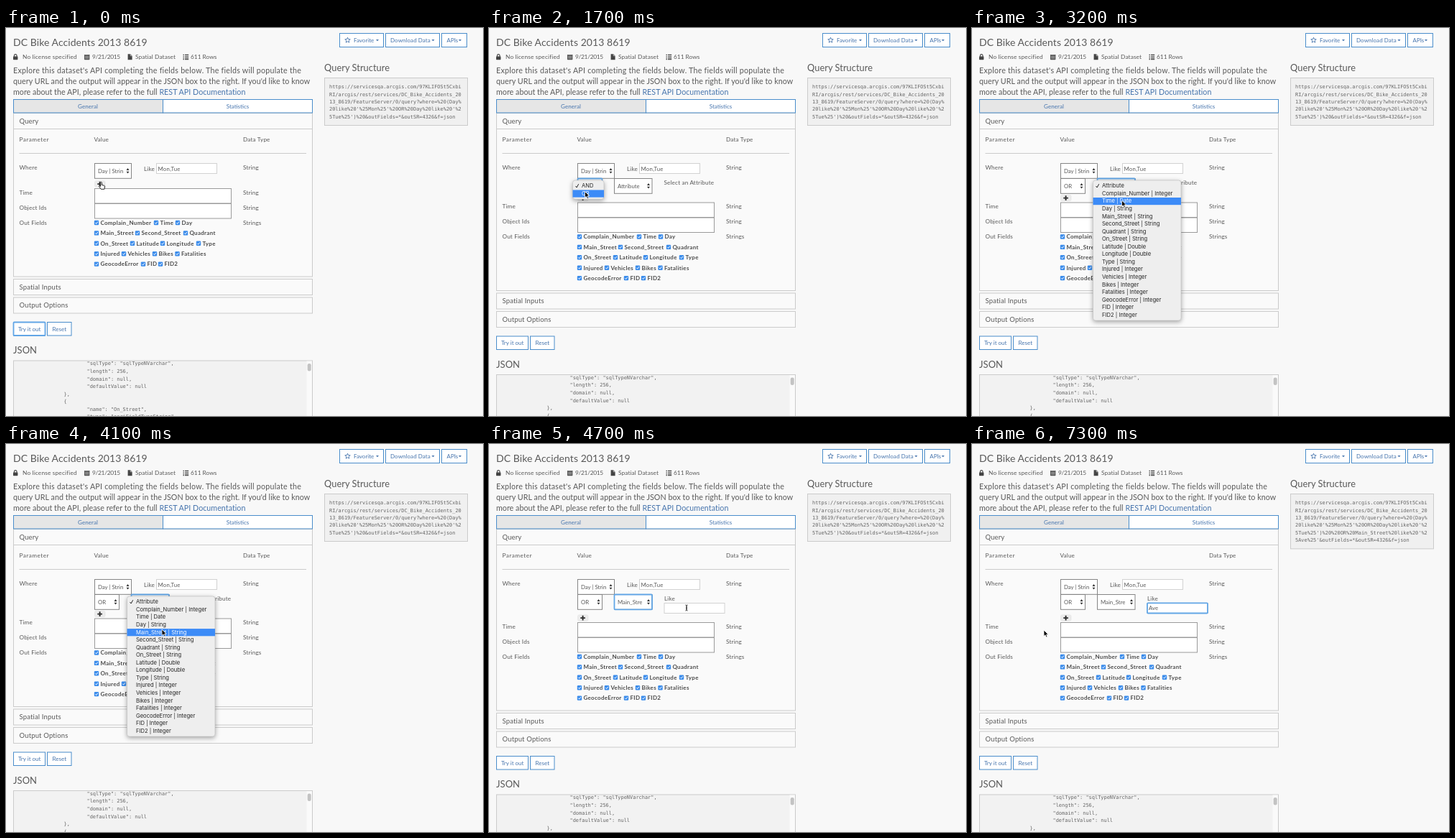
Write an HTML page that moves like this. It is 664 px wide and 540 px high and loops after 7.4 s.

```html
<!DOCTYPE html>
<html lang="en">
<head>
<meta charset="utf-8">
<title>Dataset API query</title>
<style>
  html, body { margin: 0; width: 100%; height: 100%; overflow: hidden; background: #f8f8f8; }
  svg { display: block; width: 664px; height: 540px; }
  text { font-family: Lato, sans-serif; font-kerning: normal; white-space: pre; }
  .mono { font-family: "DejaVu Sans Mono", monospace; }
  .menu { filter: drop-shadow(0 2px 3px rgba(0, 0, 0, .35)); }
  .menu text { font-family: Inter, sans-serif; }
</style>
</head>
<body>
<svg id="stage" viewBox="0 0 664 540" xmlns="http://www.w3.org/2000/svg"></svg>
<script>
const LOOP = 7400, STEP = 100;
const INK = '#595959', LINK = '#4674ad', BLUE = '#4a8dcb', LINE = '#cbcbcb', FOCUS = '#62a6e6';
const stage = document.getElementById('stage');

// Drawing helpers; text is placed by its visual middle.
function text(x, mid, size, str, o = {}) {
  const { ls = 0, fill = INK, weight = 400, anchor = 'start', cls = '', id = '' } = o;
  return `<text id="${id}" class="${cls}" x="${x}" y="${mid + size * .35}" font-size="${size}" ` +
    `letter-spacing="${ls}" fill="${fill}" font-weight="${weight}" text-anchor="${anchor}">${str}</text>`;
}
const rect = (x, y, x2, y2, fill, stroke = 'none', extra = '') =>
  `<rect x="${x}" y="${y}" width="${x2 - x}" height="${y2 - y}" fill="${fill}" stroke="${stroke}" ${extra}/>`;
const path = (d, fill, extra = '') => `<path d="${d}" fill="${fill}" ${extra}/>`;
const group = (id, body, extra = '') => `<g id="${id}" ${extra}>${body}</g>`;
const ring = (id, x, y, x2, y2) =>
  rect(x, y, x2, y2, 'none', FOCUS, `id="${id}" stroke-width="1.8" rx="1"`);
const label = (x, mid, str, ls = .15) => text(x, mid, 8.2, str, { ls });
const mono = (x, mid, str, id) => text(x, mid, 6.95, str, { cls: 'mono', fill: '#666', id });
const caret = x => path(`M${x - 2} 16h4l-2 2.3z`, LINK);
const button = (x, y, x2, y2) => rect(x, y, x2, y2, '#fff', BLUE);
const btnText = (x, mid, str, ls = 0) => text(x, mid, 8, str, { fill: LINK, ls });

function select(x, y, x2, str, id) {
  const ax = x2 - 5, m = y + 10.3;
  return rect(x, y, x2, y + 20.8, '#fff', '#858585') + text(x + 4.5, m, 7.8, str, { id }) +
    path(`M${ax - 2} ${m - .9}h4l-2 -2.8zM${ax - 2} ${m + .9}h4l-2 2.8z`, '#333');
}

function check(x, y, str) {
  return rect(x - 3.2, y - 3.2, x + 3.2, y + 3.2, '#3b8ceb', 'none', 'rx="1.2"') +
    path(`M${x - 1.7} ${y}l1.3 1.5 2.3 -3`, 'none', 'stroke="#fff" stroke-width="1"') +
    text(x + 5.4, y, 8, str, { weight: 700, ls: .3, fill: '#4c4c4c' });
}

const ROW = 10.55, MENU_Y = 219.7;
function menu(id, x, x2, items) {
  const rows = items.map((s, i) => text(x + 12.5, MENU_Y + i * ROW, 7.6, s, { fill: '#262626' })).join('');
  const bar = rect(x, MENU_Y - 4.8, x2, MENU_Y + 5.4, '#3c8bf7', 'none', `id="${id}Bar"`);
  const tick = path(`M${x + 4} ${MENU_Y + .3}l1.6 2 2.6 -4.8`, 'none', `id="${id}Tick" stroke="#262626" stroke-width="1"`);
  return group(id, rect(x, 212, x2, MENU_Y + (items.length - 1) * ROW + 8, '#eeeeee', '#bdbdbd',
    'rx="3.5" stroke-width=".6"') + bar + tick + rows, 'class="menu"');
}

const fields = [
  'Complain_Number | Integer', 'Time | Date', 'Day | String', 'Main_Street | String',
  'Second_Street | String', 'Quadrant | String', 'On_Street | String', 'Latitude | Double',
  'Longitude | Double', 'Type | String', 'Injured | Integer', 'Vehicles | Integer',
  'Bikes | Integer', 'Fatalities | Integer', 'GeocodeError | Integer', 'FID | Integer', 'FID2 | Integer'
];
const checkX = [[126, 209, 239], [126, 183, 250], [126, 176, 218, 268], [126, 164, 207, 238.5], [126, 191, 215]];

function header() {
  const small = (x, s, ls) => text(x, 40.5, 8.4, s, { ls });
  const intro = (y, s, ls) => text(10, y, 10.7, s, { ls });
  return text(10, 20, 14, 'DC Bike Accidents 2013 8619', { ls: .06 }) +
    rect(10, 39.5, 16.4, 44.2, '#444', 'none', 'rx=".6"') +
    path('M11.4 40v-1.6a1.8 1.8 0 0 1 3.6 0v1.6', 'none', 'stroke="#444" stroke-width="1.1"') +
    small(23, 'No license specified', .13) +
    rect(109, 37, 116.4, 44.2, '#555', 'none', 'rx=".6"') +
    path('M110 39.8h5.4M110 41.8h5.4M111.4 36v2M114 36v2', 'none', 'stroke="#eee" stroke-width=".6"') +
    small(120, '9/21/2015', -.3) +
    path('M169.6 36.3h3.6l2.4 2.4v5.6h-6z', '#444') +
    path('M173.2 36.3v2.4h2.4', 'none', 'stroke="#f8f8f8" stroke-width=".6"') +
    small(180, 'Spatial Dataset', .07) +
    path('M246.5 37.4h1.5M246.5 39.5h1.5M246.5 41.6h1.5M246.5 43.7h1.5M249 37.4h5.2M249 39.5h5.2M249 41.6h5.2M249 43.7h5.2',
      'none', 'stroke="#444" stroke-width="1.2"') +
    small(257, '611 Rows', -.03) +
    intro(59.2, 'Explore this dataset\'s API completing the fields below. The fields will populate the', .24) +
    intro(74, 'query URL and the output will appear in the JSON box to the right. If you\'d like to know', .06) +
    intro(89, `more about the API, please refer to the full <tspan fill="${LINK}">REST API Documentation</tspan>`, .03);
}

function sidebar() {
  const star = Array.from({ length: 10 }, (_, i) => {
    const r = i % 2 ? 1.7 : 3.9, a = i * Math.PI / 5 - Math.PI / 2;
    return `${(475.5 + r * Math.cos(a)).toFixed(2)} ${(17 + r * Math.sin(a)).toFixed(2)}`;
  }).join('L');
  let s = button(464.5, 7.5, 525.5, 26.5) + button(528.5, 7.5, 603.5, 26.5) + button(606.5, 7.5, 641.5, 26.5) +
    path(`M${star}z`, 'none', `stroke="${LINK}" stroke-width=".9"`) +
    btnText(484, 17, 'Favorite') + caret(517) + btnText(535, 17, 'Download Data', .07) + caret(594.5) +
    btnText(613.5, 17, 'APIs') + caret(632) +
    text(443, 55.2, 12.8, 'Query Structure', { ls: .05 }) +
    rect(443.5, 69.5, 642.5, 135.5, '#f0f0f0', LINE, 'id="urlBox"');
  for (let i = 0; i < 6; i++) s += mono(450, 82 + i * 10.35, '', 'url' + i);
  return s;
}

function form() {
  return rect(10.5, 118.5, 426.5, 346, '#fafafa', LINE, 'id="panel"') +
    path('M10.5 140.5H426.5M18.5 174.5H418', 'none', `stroke="${LINE}"`) +
    rect(10.5, 99.5, 218.5, 118, '#e6e6e6', BLUE) + rect(218.5, 99.5, 426.5, 118, '#fff', BLUE) +
    text(114, 108.7, 8, 'General', { anchor: 'middle', fill: LINK, ls: .05 }) +
    text(322.5, 108.7, 8, 'Statistics', { anchor: 'middle', fill: LINK }) +
    text(18.5, 130, 9.5, 'Query', { ls: .1 }) +
    label(18.5, 155.2, 'Parameter', .5) + label(122.5, 155.2, 'Value') + label(330, 155.2, 'Data Type') +
    label(18.5, 194.3, 'Where') + label(330, 194.3, 'String') +
    select(123.5, 188.5, 174.5, 'Day | Strin', 'day') + label(192, 196, 'Like') +
    rect(209.5, 188.5, 293.5, 202.5, '#fff', '#d2d2d2') + text(211.5, 196, 7.8, 'Mon,Tue', { ls: .25 }) +
    group('clause',
      select(123.5, 209.5, 157.5, '', 'op') + select(174.5, 209.5, 227, '', 'attr') +
      ring('opRing', 123.5, 209.5, 157.5, 230.3) + ring('attrRing', 174.5, 209.5, 227, 230.3) +
      group('hint', label(243.5, 215.3, 'Select an Attribute')) +
      group('like', label(244, 215.3, 'Like') + rect(244, 221.5, 328, 235.5, '#fff', '#d2d2d2') +
        ring('inputRing', 244, 221.3, 328, 235.5) + text(246, 228.5, 7.8, '', { id: 'typed' })));
}

function lower() {
  const names = fields.map(f => f.split(' ')[0]);
  let s = rect(123.5, 212.8, 138, 221.3, '#ececec', '#e2e2e2', 'rx="2" stroke-width=".6"') +
    path('M127.3 217.1h6.6M130.6 213.8v6.6', 'none', 'stroke="#2c2c2c" stroke-width="1.9"') +
    label(18.5, 229, 'Time') + label(18.5, 250, 'Object Ids') + label(18.5, 271, 'Out Fields') +
    label(330, 229, 'String') + label(330, 250, 'String') + label(330, 271, 'Strings') +
    rect(123.5, 223.5, 313.5, 244, '#fff', '#9a9a9a') + rect(123.5, 244.5, 313.5, 265, '#fff', '#9a9a9a');
  checkX.forEach((row, r) => row.forEach(x => { s += check(x, 271 + r * 14.4, names.shift()); }));
  s += rect(10.5, 349.5, 426.5, 371.5, '#fafafa', LINE) + rect(10.5, 375, 426.5, 397, '#fafafa', LINE) +
    text(18.5, 360.5, 9.5, 'Spatial Inputs', { ls: .15 }) + text(18.5, 386, 9.5, 'Output Options', { ls: .15 }) +
    button(10.5, 409.5, 54.5, 428) + button(57.5, 409.5, 91, 428) + ring('tryRing', 10.5, 409.5, 54.5, 428) +
    btnText(17, 418.7, 'Try it out') + btnText(64.5, 418.7, 'Reset') +
    text(10, 448.5, 13, 'JSON', { ls: .05 }) +
    rect(10.5, 463, 426.5, 600, '#f2f2f2', LINE) + rect(418.5, 463.5, 426, 600, '#fafafa') +
    rect(419.7, 467, 424.7, 477.5, '#c3c3c3', 'none', 'rx="2.3"');
  const json = ['"sqlType": "sqlTypeNVarchar",', '"length": 256,', '"domain": null,', '"defaultValue": null',
    '},', '{', '"name": "On_Street",', '"type": "esriFieldTypeString",'];
  s += group('json', json.map((l, i) => mono(l.length < 3 ? 80.5 : 112.5, 467 + i * 10.55, l)).join(''),
    'clip-path="url(#jsonClip)"');
  return group('lower', s);
}

function cursors() {
  const edge = 'stroke="#fff" stroke-width=".8" stroke-linejoin="round"';
  return group('cursor',
    path('M0 0v8.6l2 -1.8 1.5 3.3 1.5 -.7 -1.5 -3.2h2.7z', '#000', `id="arrow" ${edge}`) +
    path('M-.9 .8a.9 .9 0 0 1 1.8 0v3.2l3.4 .8q1 .4 .8 1.6l-.7 3.4h-4.6l-2.7 -3.6q-.2 -1.4 1 -1l1 .8z', '#fff',
      'id="hand" stroke="#111" stroke-width=".9" stroke-linejoin="round"') +
    path('M-1.6 .5q1.6 0 1.6 1v6q0 1 -1.6 1M1.6 .5q-1.6 0 -1.6 1v6q0 1 1.6 1M-.8 4.8h1.6', 'none',
      'id="beam" stroke="#333" stroke-width=".9"'));
}

stage.innerHTML = '<defs><clipPath id="jsonClip"><rect x="11" y="463.5" width="407" height="140"/></clipPath></defs>' +
  rect(0, 0, 664, 540, '#f8f8f8') + header() + sidebar() + form() + lower() +
  menu('opMenu', 116.5, 160, ['AND', 'OR']) + menu('attrMenu', 168.5, 291, ['Attribute', ...fields]) + cursors();

const el = {};
stage.querySelectorAll('[id]').forEach(n => { if (n.id) el[n.id] = n; });
const show = (id, on) => { el[id].style.display = on ? '' : 'none'; };
const write = (id, s) => { if (el[id].textContent !== s) el[id].textContent = s; };

// Timelines: [start ms, value]
const shifts = [[0, 0], [500, 19.5], [4400, 25]];
const focus = [[0, 'tryRing'], [300, ''], [1200, 'opRing'], [2600, 'attrRing'], [5100, 'inputRing']];
const menus = [[0, ''], [1200, 'opMenu'], [1800, ''], [2600, 'attrMenu'], [4400, '']];
const ops = [[0, 'AND'], [1800, 'OR']];
const attrs = [[0, 'Attribute'], [4400, 'Main_Stre']];
const typing = [[0, ''], [5400, 'A'], [5600, 'Av'], [5700, 'Ave']];
const pointers = [[0, 'hand'], [500, 'arrow'], [4600, 'beam'], [5400, ''], [6200, 'beam'], [6500, 'arrow']];
const clauses = [[0, ''], [6200, "%20OR%20Main_Street%20like%20'%25Ave%25'"]];
const track = [
  [0, 132.5, 214.5], [500, 132.5, 214.5], [900, 132, 214.5], [1300, 132, 216], [1600, 133, 228], [1800, 134, 227],
  [2300, 202, 216.5], [2700, 202, 216.5], [3100, 208.5, 240], [3400, 208.5, 240], [3900, 217, 258], [4400, 217, 258],
  [4700, 275, 223.5], [6200, 275, 223.5], [6900, 100, 259], [7400, 100, 259]
];

const at = (list, t) => list.filter(k => k[0] <= t).pop()[1];

function position(t) {
  const i = track.findIndex(k => k[0] > t), [t0, x0, y0] = track[i - 1], [t1, x1, y1] = track[i];
  const p = (t - t0) / (t1 - t0), e = p * p * (3 - 2 * p);
  return [x0 + (x1 - x0) * e, y0 + (y1 - y0) * e];
}

function highlight(id, y) {
  const items = [...el[id].querySelectorAll('text')];
  const row = Math.max(0, Math.min(items.length - 1, Math.round((y + 1 - MENU_Y) / ROW)));
  el[id + 'Bar'].setAttribute('transform', `translate(0 ${row * ROW})`);
  el[id + 'Tick'].setAttribute('stroke', row ? '#262626' : '#fff');
  items.forEach((n, i) => n.setAttribute('fill', i === row ? '#fff' : '#262626'));
}

function draw(t) {
  const dy = at(shifts, t), open = at(menus, t), focused = at(focus, t), attr = at(attrs, t);
  const [x, y] = position(t);
  el.lower.setAttribute('transform', `translate(0 ${dy})`);
  el.panel.setAttribute('height', 227.5 + dy);
  show('clause', dy > 0);
  show('hint', attr === 'Attribute');
  show('like', attr !== 'Attribute');
  for (const id of ['tryRing', 'opRing', 'attrRing', 'inputRing']) show(id, id === focused);
  for (const id of ['opMenu', 'attrMenu']) show(id, id === open);
  if (open) highlight(open, y);
  write('op', at(ops, t));
  write('attr', attr);
  write('typed', at(typing, t));

  const url = 'https://servicesqa.arcgis.com/97KLIFOSt5CxbiRI/arcgis/rest/services/DC_Bike_Accidents_2013_8619' +
    "/FeatureServer/0/query?where=%20(Day%20like%20'%25Mon%25'%20OR%20Day%20like%20'%25Tue%25')%20" +
    at(clauses, t) + '&outFields=*&outSR=4326&f=json';
  const lines = url.match(/.{1,44}/g);
  for (let i = 0; i < 6; i++) write('url' + i, lines[i] || '');
  el.urlBox.setAttribute('height', 14.2 + lines.length * 10.36);

  const pointer = at(pointers, t);
  for (const id of ['arrow', 'hand', 'beam']) show(id, id === pointer);
  el.cursor.setAttribute('transform', `translate(${x} ${y})`);
}

const start = performance.now();
function tick() {
  const t = (performance.now() - start) % LOOP;
  draw(Math.floor(t / STEP) * STEP);
  requestAnimationFrame(tick);
}
draw(0);
requestAnimationFrame(tick);
</script>
</body>
</html>
```
